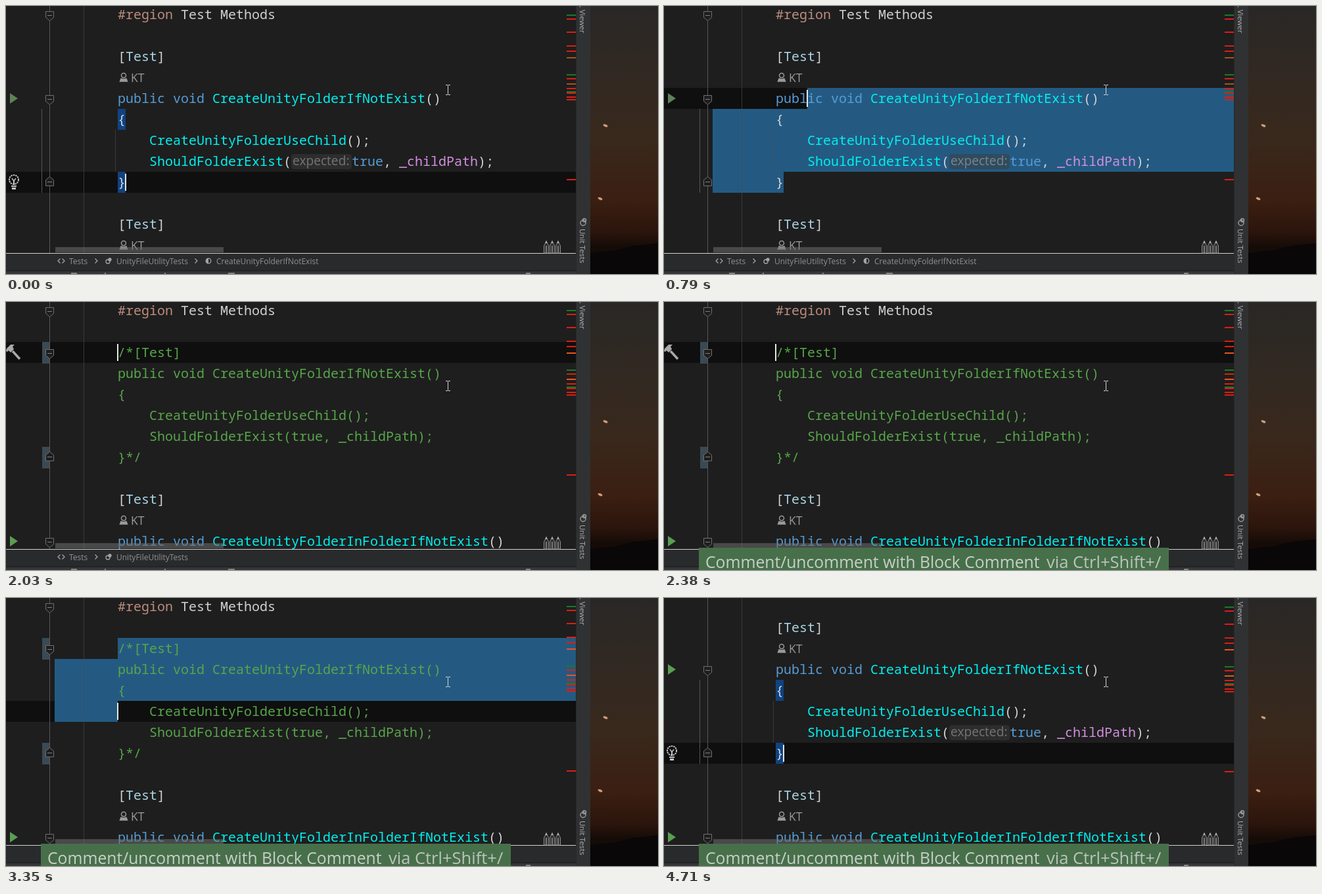
Recreate the animation shown at these times as an HTML page with a canvas. Size 992x409 px, loop 4.96 s.

```html
<!DOCTYPE html>
<html lang="en">
<head>
<meta charset="utf-8">
<title>Block comment</title>
<style>
html, body { margin: 0; width: 100%; height: 100%; overflow: hidden; background: #1e1e1e; }
canvas { display: block; }
</style>
</head>
<body>
<canvas id="stage" width="992" height="409"></canvas>
<script>
const g = document.getElementById('stage').getContext('2d');
const LOOP = 4960, LEFT = 170, CHAR = 12, EDGE = 867;
const MONO = '20px "Noto Sans Mono", "DejaVu Sans Mono", monospace';
const ui = (size, weight = 400) => `${weight} ${size}px "Open Sans", "Noto Sans", sans-serif`;
const COLOR = {
  k: '#569cd6', m: '#00f0f0', p: '#d4d4d4', f: '#d08fdd',
  a: '#a9d5e6', c: '#57a64a', r: '#bd8d7d', d: '#d0d0d0'
};

// caret stops: time, x, row centre
const STOPS = [
  [0, 182, 269], [370, 218, 237], [510, 218, 205], [640, 182, 173], [780, 218, 141],
  [910, 218, 77], [1130, 206, 77], [1230, 194, 77], [1330, 182, 77], [1430, 170, 77],
  [3100, 170, 109], [3220, 170, 141], [3350, 170, 173], [3480, 170, 205], [3610, 170, 237],
  [3680, 182, 237], [3750, 194, 237], [3820, 206, 237], [4290, 182, 237]
];
const MARKS = [
  [13, 'g'], [19, 'r'], [39, 'r'], [60, 'r'], [68, 'r'], [78, 'o'], [104, 'g'], [110, 'r'],
  [118, 'o'], [125, 'r'], [130, 'g'], [132, 'r'], [138, 'r'], [142, 'r'], [264, 'r']
];

function rect(x, y, w, h, color) {
  g.fillStyle = color;
  g.fillRect(x, y, w, h);
}

function text(s, x, y, font, color) {
  g.font = font;
  g.fillStyle = color;
  g.fillText(s, x, y);
}

function path(points, color, fill, close = true) {
  g.beginPath();
  points.forEach(([x, y]) => g.lineTo(x, y));
  if (close) g.closePath();
  if (fill) { g.fillStyle = fill; g.fill(); }
  if (color) { g.strokeStyle = color; g.stroke(); }
}

function disc(x, y, r, color, fill) {
  g.beginPath();
  g.arc(x, y, r, 0, 7);
  if (fill) { g.fillStyle = fill; g.fill(); }
  if (color) { g.strokeStyle = color; g.stroke(); }
}

// parts alternate colour key and text
function code(row, col, ...parts) {
  let x = LEFT + col * CHAR;
  for (let i = 0; i < parts.length; i += 2) {
    text(parts[i + 1], x, row + 7, MONO, COLOR[parts[i]]);
    x += parts[i + 1].length * CHAR;
  }
}

function attribute(row) {
  code(row, 0, 'p', '[', 'a', 'Test', 'p', ']');
}

function author(row, selected) {
  const color = selected ? '#b4bcc2' : '#9a9a9a';
  g.lineWidth = 1.5;
  disc(179, row - 3, 3.5, color);
  path([[173.5, row + 6], [175, row + 2], [179, row + 3], [183, row + 2], [184.5, row + 6]], color, color);
  text('KT', 190, row + 7, ui(17.5), color);
}

function signature(row, name) {
  code(row, 0, 'k', 'public void', 'm', ' ' + name, 'p', '()');
}

function body(row, hints, selected) {
  code(row, 0, 'p', '{');
  code(row + 32, 4, 'm', 'CreateUnityFolderUseChild', 'p', '();');
  code(row + 64, 4, 'm', 'ShouldFolderExist', 'p', '(');
  if (hints) {
    g.beginPath();
    g.roundRect(434, row + 53, 92, 23, 4);
    g.fillStyle = 'rgba(60,60,60,.5)';
    g.fill();
    text('expected:', 436, row + 70, ui(19.2), selected ? '#7b858c' : '#747474');
  }
  const x = hints ? 526 : 434;
  code(row + 64, (x - LEFT) / CHAR, 'k', 'true', 'p', ', ', 'f', '_childPath', 'p', ');');
  code(row + 96, 0, 'p', '}');
}

function fold(y, up) {
  const s = up ? -1 : 1;
  g.lineWidth = 1;
  path([[60.5, y - 6 * s], [72.5, y - 6 * s], [72.5, y + 3 * s], [66.5, y + 8 * s], [60.5, y + 3 * s]],
    '#707070', '#1e1e1e');
  rect(63, y - .5, 7, 1, '#808080');
}

function run(row, bright) {
  path([[6, row - 8], [18, row], [6, row + 8]], null, bright ? '#5a9e52' : '#5f8259');
}

function hammer(row) {
  const grey = '#a9a9a9';
  path([[0, row - 2], [1, row - 6], [7, row - 12], [13, row - 12], [10, row - 9], [12, row - 5],
    [7, row], [4, row - 3], [2, row - 1]], null, grey);
  g.lineWidth = 3.5;
  path([[10, row - 2], [21, row + 10]], grey, null, false);
}

function bulb(row) {
  const y = row - 4;
  g.lineWidth = 2;
  g.setLineDash([2.5, 1]);
  disc(12, y, 7, '#c4c4c4');
  g.setLineDash([]);
  g.lineWidth = 1.5;
  path([[9, y - 2], [12, y + 2], [15, y - 2]], '#c4c4c4', null, false);
  rect(11, y + 1, 2, 7, '#c4c4c4');
  rect(8, y + 9, 8, 2, '#c4c4c4');
  rect(9, y + 12, 6, 3, '#c4c4c4');
}

function select(a, b, color) {
  if (a.y > b.y) [a, b] = [b, a];
  if (a.y === b.y) return rect(Math.min(a.x, b.x), a.y - 16, Math.abs(b.x - a.x), 32, color);
  rect(a.x, a.y - 16, EDGE - a.x, 32, color);
  rect(74, a.y + 16, EDGE - 74, b.y - a.y - 32, color);
  rect(74, b.y - 16, b.x - 74, 32, color);
}

function sideways(s, y, align) {
  g.save();
  g.translate(873, y);
  g.rotate(Math.PI / 2);
  g.textAlign = align;
  text(s, 0, 0, ui(11.5), '#b0b0b0');
  g.restore();
}

function wallpaper() {
  const sky = g.createLinearGradient(0, 0, 0, 409);
  [[0, '#292725'], [.25, '#312922'], [.5, '#39281c'], [.72, '#3b1f12'], [.84, '#2c150c'], [.9, '#150b07']]
    .forEach(([at, c]) => sky.addColorStop(at, c));
  rect(889, 0, 103, 409, sky);
  path([[889, 377], [925, 373], [955, 366], [992, 362], [992, 409], [889, 409]], null, '#090707');
  for (const [x, y] of [[912, 182.5], [904, 294]]) {
    g.beginPath();
    g.ellipse(x, y, 3.6, 1.8, .4, 0, 7);
    g.fillStyle = '#cf9d7a';
    g.fill();
  }
}

function sidebar() {
  rect(EDGE, 0, 22, 409, '#303132');
  rect(EDGE, 0, 1, 409, '#292929');
  rect(889, 0, 1, 409, '#171717');
  sideways('IL Viewer', 41.5, 'right');
  sideways('Unit Tests', 340, 'left');
  g.lineWidth = 1.3;
  disc(878, 331, 4, '#a5a5a5');
  disc(880, 327, 2.5, '#a5a5a5');
}

function crumbs(t) {
  rect(0, 378, EDGE, 25, '#292a2c');
  rect(0, 403, EDGE, 2, '#222324');
  rect(0, 405, EDGE, 4, '#343638');
  rect(0, 377, EDGE, 1, '#d0d0d0');
  [[99, 9], [150, 2], [241, 2], [338, 10], [791, 7]].forEach(([x, w]) => rect(x, 407, w, 2, '#85817c'));
  const grey = '#929292', font = ui(12);
  const chevron = (x, s = 1) =>
    path([[x, 389 - 3.5], [x + 3.5 * s, 389], [x, 389 + 3.5]], '#a5a5a5', null, false);
  g.lineWidth = 1.3;
  chevron(82.5, -1);
  chevron(85.5);
  text('Tests', 96, 394, font, grey);
  chevron(135.5);
  disc(155, 390, 3, '#a5a5a5');
  disc(158, 387, 2, '#a5a5a5', '#a5a5a5');
  text('UnityFileUtilityTests', 168, 394, font, grey);
  if (t >= 1460) return;
  chevron(287.5);
  disc(308, 389, 3.8, '#a5a5a5');
  g.beginPath();
  g.arc(308, 389, 3.8, Math.PI / 2, Math.PI * 1.5);
  g.fillStyle = '#a5a5a5';
  g.fill();
  text('CreateUnityFolderIfNotExist', 320, 394, font, grey);
}

function overlay(t, commented) {
  for (const [y, kind] of MARKS) {
    const color = kind === 'g' ? '#187a2c' : kind === 'r' ? '#df1d12' : t < 2030 ? '#a9511f' : '#ee541b';
    rect(853, commented ? y - 1 : y, 14, 2, color);
  }
  rect(75, 368, 256, 8, 'rgba(110,110,110,.55)');
  g.lineWidth = 1;
  for (let x = 818; x < 840; x += 9) {
    path([[x + .5, 377], [x + .5, 366], [x + 4, 358.5], [x + 7.5, 366], [x + 7.5, 377]], '#8c8c8c', '#303030');
    path([[x + 2.5, 362], [x + 4, 358], [x + 5.5, 362]], null, '#b5b5b5');
    rect(x + 3, 366, 2, 11, '#777');
  }
  rect(672, 121, 1, 14, '#d5d5d5');
  for (const y of [120, 135]) {
    rect(669, y, 3, 1, '#d5d5d5');
    rect(673, y, 3, 1, '#d5d5d5');
  }
}

function popup(t) {
  g.globalAlpha = Math.min(1, Math.max(0, (t - 2070) / 310));
  rect(53, 375, 715, 34, '#47704a');
  text('Comment/uncomment with Block Comment', 63, 406, ui(24.7, 500), '#c8cfc8');
  text('via Ctrl+Shift+/', 582, 406, ui(25.5), '#bcc3bc');
  g.globalAlpha = 1;
}

function draw(t) {
  const commented = t >= 2030 && t < 4290;
  const restored = t >= 4290;
  const parsed = t >= 4430;
  const [, x, y] = STOPS.findLast(s => s[0] <= t);
  const anchor = t >= 370 && t < 2030 ? { x: 182, y: 269 }
    : t >= 3100 && t < 4290 ? { x: 170, y: 77 } : null;
  const head = t < 2030 ? 141 : 109;        // row of the method signature
  const end = head + 128;
  const selected = row => anchor && row >= Math.min(y, anchor.y) && row <= Math.max(y, anchor.y);

  rect(0, 0, 992, 409, '#1e1e1e');
  rect(0, y - 16, EDGE, 32, '#0f0f0f');
  if (anchor) select(anchor, { x, y }, '#245a82');

  // guides and folding
  rect(118, 0, 1, 378, 'rgba(75,75,75,.65)');
  if (!commented) {
    rect(166, head + 48, 1, 64, 'rgba(75,75,75,.65)');
    rect(54, head + 16, 1, 128, '#555');
  } else {
    rect(55, 61, 11, 33, '#3a4a55');
    rect(55, 221, 11, 33, '#3a4a55');
  }
  rect(66, 0, 1, 378, '#585858');
  if (!parsed) fold(14.5);
  fold(commented ? 78.5 : head + 1.5);
  fold(end - .5, true);
  if (t >= 2030) fold(366.5);

  // code
  if (!parsed) code(13, 0, 'r', '#region', 'd', ' Test Methods');
  if (commented) {
    ['/*[Test]', 'public void CreateUnityFolderIfNotExist()', '{', '    CreateUnityFolderUseChild();',
      '    ShouldFolderExist(true, _childPath);', '}*/'].forEach((s, i) => code(77 + 32 * i, 0, 'c', s));
  } else {
    if (t < 370 || t >= 4500) {
      rect(170, head + 16, 12, 32, '#0f4382');
      rect(170, end - 16, 12, 32, '#0f4382');
    }
    const hints = !restored || parsed;
    attribute(parsed ? 45 : 77);
    if (hints) author(head - 32, selected(109));
    signature(head, 'CreateUnityFolderIfNotExist');
    body(head + 32, hints, selected(237));
    if (hints) run(head, restored);
  }
  if (t < 2030) {
    attribute(333);
    author(365);
  } else {
    attribute(301);
    author(333);
    signature(365, 'CreateUnityFolderInFolderIfNotExist');
    run(365, true);
  }

  // caret and gutter actions
  const blinkOff = t >= 110 && t < 370 || t >= 2790 && t < 3100;
  if (!blinkOff) rect(x - 1, y - 13, 2, 26, '#e6e6e6');
  if (t < 370 || t >= 4710) bulb(y);
  if (t >= 1560 && t < 3100 || t >= 3900 && t < 4290) hammer(y);

  crumbs(t);
  overlay(t, commented);
  if (t >= 2030) popup(t);
  sidebar();
  wallpaper();
}

const start = performance.now();
function tick() {
  draw((performance.now() - start) % LOOP);
  requestAnimationFrame(tick);
}
tick();
</script>
</body>
</html>
```
